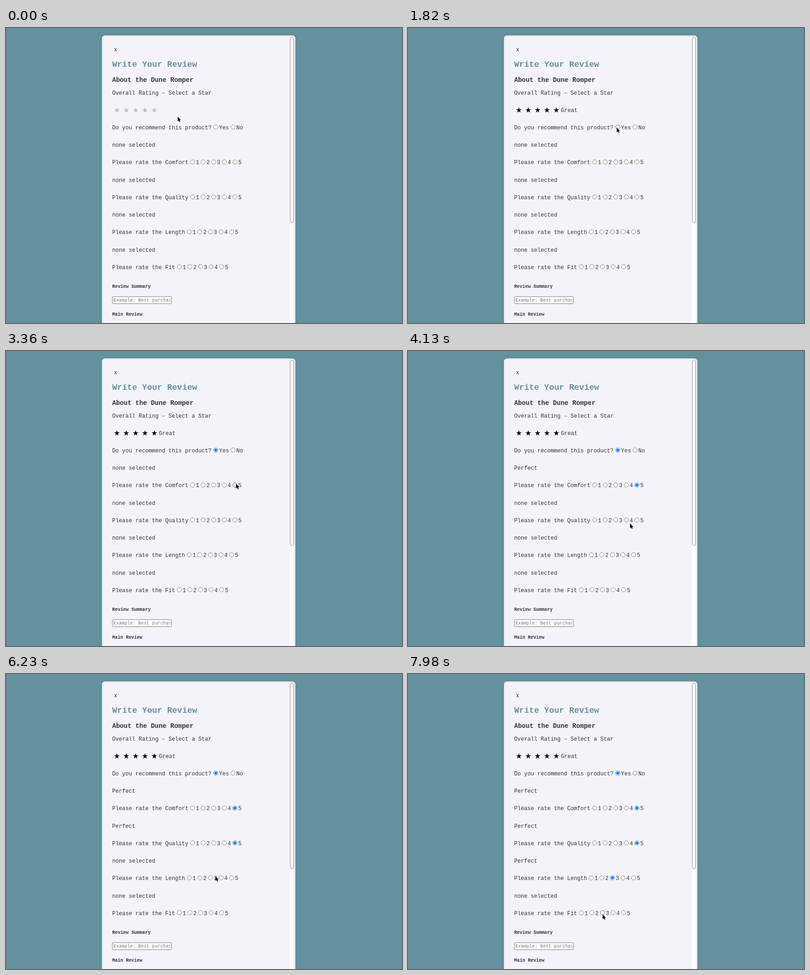
Animation of 867 by 646 pixels, one loop 8 s. Source, as an HTML page:

```html
<!DOCTYPE html>
<html lang="en">
<head>
<meta charset="utf-8">
<title>Write Your Review</title>
<style>
  html, body { margin: 0; width: 100%; height: 100%; overflow: hidden; background: #64919e; }
  svg { display: block; width: 100%; height: 100%; }
  text { font-family: "Liberation Mono", "Courier New", monospace; font-size: 12.1px; fill: #333; white-space: pre; }
  .title { font-size: 18.25px; font-weight: bold; fill: #64919e; }
  .heading { font-size: 14.15px; font-weight: bold; }
  .label { font-size: 10.04px; font-weight: bold; }
  .hint { font-size: 10.08px; fill: #757575; }
  .close { font-size: 10.08px; fill: #000; }
</style>
</head>
<body>
<svg id="stage" viewBox="0 0 867 646">
  <defs>
    <filter id="shadow" x="-10%" y="-10%" width="120%" height="120%">
      <feDropShadow dx="0" dy="1" stdDeviation="3" flood-opacity=".12"/>
    </filter>
    <clipPath id="field"><rect x="234" y="589" width="126" height="15"/></clipPath>
  </defs>
  <rect width="867" height="646" fill="#64919e"/>
  <rect x="210" y="16.2" width="423.5" height="660" rx="7" fill="#eceef0" filter="url(#shadow)"/>
  <rect x="214" y="20" width="416" height="660" rx="3" fill="#fff"/>
  <path d="M214 646V23Q214 20 217 20H621.5V646Z" fill="#f4f3fa"/>
  <rect x="622.4" y="20.5" width="7.2" height="405.8" rx="3.6" fill="#fafafa" stroke="#8b8b8b"/>
  <rect x="233" y="588.3" width="129.3" height="15.4" rx="1.5" fill="#fff" stroke="#767676"/>
</svg>
<script>
const LOOP = 8000, STEP = 70;
const LEFT = 232.4, PITCH = 7.26, ROW = 76.45;
const stage = document.getElementById("stage");

function add(tag, attrs, content = "") {
  const node = document.createElementNS("http://www.w3.org/2000/svg", tag);
  for (const key in attrs) node.setAttribute(key, attrs[key]);
  node.textContent = content;
  stage.append(node);
  return node;
}
const write = (content, x, y, style = "") => add("text", { x, y, class: style }, content);

write("X", 237, 50.6, "close");
write("Write Your Review", LEFT, 85, "title");
write("About the Dune Romper", LEFT, 117.5, "heading");
write("Overall Rating – Select a Star", LEFT, 146);
write("Review Summary", LEFT, 568.6, "label");
write("Main Review", LEFT, 630.2, "label");
write("Example: Best purchase", 235.2, 599.4, "hint").setAttribute("clip-path", "url(#field)");

function starPoints(cx, cy) {
  return Array.from({ length: 10 }, (_, i) => {
    const r = i % 2 ? 2.45 : 6.4, a = i * Math.PI / 5 - Math.PI / 2;
    return `${(cx + r * Math.cos(a)).toFixed(2)},${(cy + r * Math.sin(a)).toFixed(2)}`;
  }).join(" ");
}
const stars = Array.from({ length: 5 }, (_, i) => add("polygon", { points: starPoints(242.8 + i * 20.5, 180) }));
const verdict = write("Great", 334.8, 184);

function makeRadio(cx, cy, checkedAt) {
  return {
    cx, cy, checkedAt,
    ring: add("circle", { cx, cy, r: 4.7, fill: "#fff", "stroke-width": 0.95 }),
    dot: add("circle", { cx, cy, r: 3 })
  };
}

const radios = [], notes = [];

function ask(row, question, options, answer, time) {
  const y = 221.8 + row * ROW;
  write(question, LEFT, y);
  let x = LEFT + question.length * PITCH + 9.1;
  for (const option of options) {
    radios.push(makeRadio(x, y - 4.8, option === answer ? time : Infinity));
    write(option, x + 7.3, y);
    x += 15.9 + option.length * PITCH;
  }
  if (row) notes.push({ node: write("none selected", LEFT, y - 38.1), time });
}

ask(0, "Do you recommend this product?", ["Yes", "No"], "Yes", 2100);
ask(1, "Please rate the Comfort", "12345", "5", 3850);
ask(2, "Please rate the Quality", "12345", "5", 5320);
ask(3, "Please rate the Length", "12345", "3", 6860);
ask(4, "Please rate the Fit", "12345", "", Infinity);

const cursor = add("path", {
  d: "M0 0V10.6L2.4 8.4L4 12.1L5.9 11.3L4.3 7.7H7.4Z",
  fill: "#000", stroke: "#fff", "stroke-width": 1.1, "paint-order": "stroke"
});

// Each move eases to a resting point; bow bends its path sideways
const home = { x: 375.8, y: 194 };
const moves = [
  { from: 140, to: 560, x: 295, y: 154 },
  { from: 630, to: 980, x: 526, y: 202 },
  { from: 1050, to: 1400, x: 467, y: 207 },
  { from: 1470, to: 1960, x: 458, y: 219, bow: -1.5 },
  { from: 2100, to: 2660, x: 432, y: 298 },
  { from: 2800, to: 3710, x: 508, y: 293, bow: 0.2 },
  { from: 3850, to: 4130, x: 486, y: 377.5 },
  { from: 4410, to: 5180, x: 503.5, y: 370, bow: 1 },
  { from: 5320, to: 6930, x: 450, y: 446, bow: 0.2 },
  { from: 7140, to: 7910, x: 426, y: 526 }
];

function pointerAt(t) {
  let { x, y } = home;
  for (const { from, to, x: endX, y: endY, bow = 0 } of moves) {
    if (t <= from) break;
    const k = 1 - (1 - Math.min(1, (t - from) / (to - from))) ** 3;
    const side = bow * Math.sin(Math.PI * k);
    const dx = endX - x, dy = endY - y;
    x += dx * k + dy * side;
    y += dy * k - dx * side;
  }
  return [x, y];
}

function render(time) {
  const t = Math.floor(time % LOOP / STEP) * STEP;
  const [px, py] = pointerAt(t);
  cursor.setAttribute("transform", `translate(${px.toFixed(2)} ${py.toFixed(2)})`);

  stars.forEach(star => star.setAttribute("fill", t >= 350 ? "#000" : "#c0bdb8"));
  verdict.setAttribute("visibility", t >= 700 ? "visible" : "hidden");
  notes.forEach(({ node, time }) => node.textContent = t >= time ? "Perfect" : "none selected");

  radios.forEach(({ cx, cy, checkedAt, ring, dot }) => {
    const hover = Math.hypot(px - cx, py - cy) < 5.5;
    const checked = t >= checkedAt;
    const blue = hover ? "#005cc8" : "#0b72e7";
    ring.setAttribute("stroke", checked ? blue : hover ? "#4f4f4f" : "#767676");
    dot.setAttribute("fill", checked ? blue : "none");
  });
}

const start = performance.now();
function tick() {
  render(performance.now() - start);
  requestAnimationFrame(tick);
}
tick();
</script>
</body>
</html>
```
